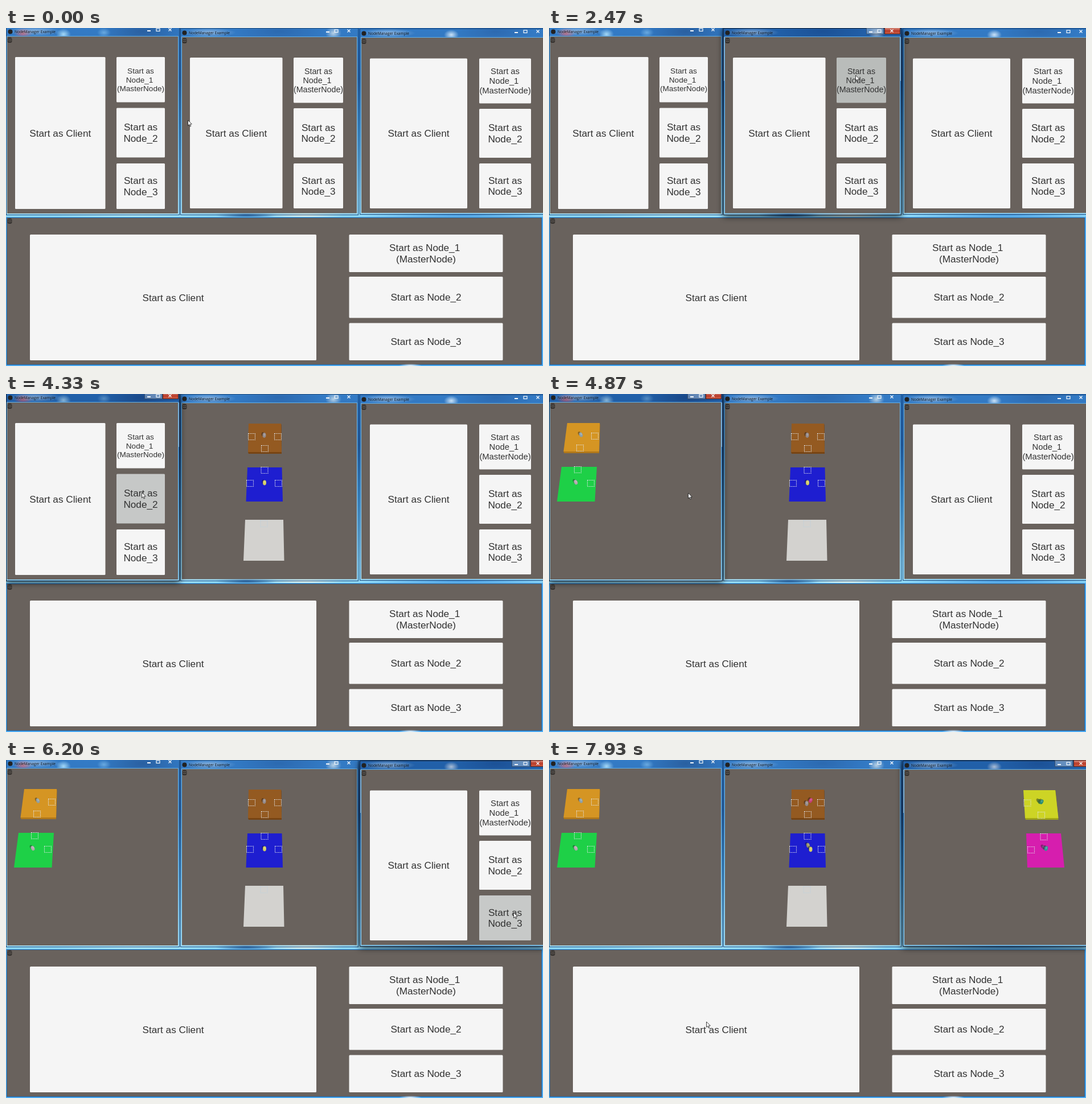
An HTML page with a canvas that plays this animation: 943 px wide and 594 px high, repeating every 8000 ms.

```html
<!DOCTYPE html>
<html lang="en">
<head>
<meta charset="utf-8">
<title>NodeManager Example</title>
<style>
html, body { margin: 0; width: 100%; height: 100%; overflow: hidden; background: #69625d; }
canvas { display: block; }
</style>
</head>
<body>
<canvas id="stage" width="943" height="594"></canvas>
<script>
const ctx = document.getElementById('stage').getContext('2d');
const LOOP = 8000, STEP = 1000 / 15;
const UI_FONT = '"Liberation Sans", Arial, sans-serif';

// frame / client: left, top, right, bottom; controls: centres of the caption buttons
const windows = [
  { frame: [0, -2, 305, 329], client: [2, 15, 302, 326], title: 6, controls: [251, 267, 288],
    buttons: { client: [16, 51, 174.5, 318], x: [194, 279], y: [51, 130.5, 140.5, 227.5, 238, 318], small: 13.6 },
    pressed: 1, press: 4267, hide: 4533, show: 4667, shade: '#c6c8c7', scene: leftScene },
  { frame: [306, 0, 619, 329], client: [309, 16, 616, 325.5], title: 8, controls: [565, 580, 602],
    buttons: { client: [323, 52, 485.5, 317], x: [505, 592], y: [52, 131.5, 141, 227.5, 238, 317], small: 14.25 },
    pressed: 0, press: 2400, hide: 2533, show: 2667, shade: '#b9bcba', scene: middleScene },
  { frame: [621, 1, 946, 328], client: [624, 17, 946, 325], title: 9, controls: [896, 912, 934],
    buttons: { client: [639, 53.5, 810, 317], x: [831, 922], y: [53.5, 132.5, 142, 228, 238, 317], small: 14.75 },
    pressed: 2, press: 6067, hide: 6267, show: 6400, shade: '#c7c9c8', scene: rightScene }
];
const bottomButtons = { client: [42, 363, 545, 584], x: [602.5, 872.5], y: [363, 429, 437, 509.5, 518.5, 584], small: 17.2, wide: true };

// time, x, y of the pointer tip
const pointerPath = [
  [0, 319, 162], [133, 319, 162], [267, 313, 157], [533, 313, 157], [733, 272, 177], [933, 237, 99],
  [1533, 237, 99], [1933, 526, 77], [2067, 538, 83], [2800, 538, 83], [3000, 455, 116], [3667, 237, 133],
  [3933, 238, 173], [4800, 238, 173], [4867, 244, 174], [5667, 895, 250], [5733, 892, 266],
  [5933, 891, 268], [6800, 891, 268], [7667, 276, 460], [8000, 276, 460]
];

const clamp = v => Math.max(0, Math.min(1, v));
const smooth = v => v * v * (3 - 2 * v);

function box([l, t, r, b], fill) {
  ctx.fillStyle = fill;
  ctx.fillRect(l, t, r - l, b - t);
}

function outline([l, t, r, b], colour, grow = 0) {
  ctx.strokeStyle = colour;
  ctx.lineWidth = 1;
  ctx.strokeRect(l - grow + .5, t - grow + .5, r - l + 2 * grow - 1, b - t + 2 * grow - 1);
}

function polygon(points, fill) {
  ctx.beginPath();
  for (let i = 0; i < points.length; i += 2) ctx.lineTo(points[i], points[i + 1]);
  ctx.closePath();
  ctx.fillStyle = fill;
  ctx.fill();
}

function vertical(top, bottom, ...stops) {
  const g = ctx.createLinearGradient(0, top, 0, bottom);
  stops.forEach(([at, colour]) => g.addColorStop(at, colour));
  return g;
}

function glow(x, y, rx, ry, rgb, alpha) {
  ctx.save();
  ctx.translate(x, y);
  ctx.scale(rx, ry);
  const g = ctx.createRadialGradient(0, 0, 0, 0, 0, 1);
  g.addColorStop(0, `rgba(${rgb},${alpha})`);
  g.addColorStop(1, `rgba(${rgb},0)`);
  ctx.fillStyle = g;
  ctx.fillRect(-1, -1, 2, 2);
  ctx.restore();
}

function wallpaper() {
  box([0, 0, 943, 594], vertical(0, 594,
    [0, '#1d66b8'], [.15, '#1c5aa4'], [.3, '#3b94d8'], [.5, '#8bd6f6'], [.56, '#8fd8f6'], [1, '#2c92e6']));
  glow(240, 6, 75, 30, '8,40,98', .55);
  glow(480, 6, 80, 22, '10,55,125', .45);
  glow(860, 6, 70, 22, '12,55,125', .45);
  glow(30, 9, 16, 9, '225,60,70', .9);
  glow(101, 11, 13, 10, '190,235,255', .9);
  glow(172, 8, 12, 8, '130,190,235', .7);
  glow(575, 9, 14, 12, '240,240,235', .8);
  glow(782, 12, 13, 9, '245,250,255', .9);
  glow(225, 328, 140, 10, '190,240,255', .8);
  glow(422, 328, 55, 8, '16,70,140', .9);
  glow(525, 328, 70, 8, '250,245,225', .9);
  glow(800, 328, 180, 10, '50,135,215', .8);
}

function label(lines, x, y, size) {
  const leading = size * 1.14;
  ctx.font = `${size}px ${UI_FONT}`;
  ctx.textAlign = 'center';
  ctx.fillStyle = '#323232';
  lines.forEach((line, i) =>
    ctx.fillText(line, x, Math.round(y + (i - (lines.length - 1) / 2) * leading + size * .36)));
}

function button(rect, lines, size, fill = '#f5f5f5') {
  const [l, t, r, b] = rect;
  ctx.beginPath();
  ctx.roundRect(l, t, r - l, b - t, 1.5);
  ctx.fillStyle = fill;
  ctx.fill();
  label(lines, (l + r) / 2, (t + b) / 2, size);
}

function menu({ client, x, y, small, wide }, pressed = -1, shade) {
  button(client, ['Start as Client'], 17.2);
  // the trailing space of Node_1 takes part in the centring
  ['Node_1 ', 'Node_2', 'Node_3'].forEach((name, i) => {
    const lines = wide ? [`Start as ${name}`] : ['Start as', name];
    if (i === 0) lines.push('(MasterNode)');
    button([x[0], y[2 * i], x[1], y[2 * i + 1]], lines, i ? 17.2 : small, i === pressed ? shade : undefined);
  });
}

function stackIcon(x, y) {
  ctx.fillStyle = '#36322f';
  ctx.beginPath();
  ctx.roundRect(x - 4, y - 4.5, 8, 9.5, 3);
  ctx.fill();
  ctx.strokeStyle = '#8a827b';
  ctx.lineWidth = .7;
  for (const dy of [-2.5, .5]) {
    ctx.beginPath();
    ctx.ellipse(x, y + dy, 3.3, 1.3, 0, 0, Math.PI);
    ctx.stroke();
  }
}

function captionButtons([min, max, close], y, active) {
  if (active) {
    const pair = [min - 8, y - 8, max + 8, y + 4], red = [close - 13, y - 8, close + 15, y + 4];
    box(pair, 'rgba(205,220,235,.4)');
    outline(pair, 'rgba(25,40,60,.6)');
    box(red, vertical(y - 8, y + 4, [0, '#d99a8c'], [.5, '#b93a28'], [1, '#cf6248']));
    outline(red, '#53201c');
  }
  box([min - 3, y - 1, min + 3, y + 1], '#f4f8fc');
  ctx.strokeStyle = '#f4f8fc';
  ctx.lineWidth = 1.2;
  ctx.strokeRect(max - 3, y - 4, 6, 4.5);
  ctx.beginPath();
  ctx.moveTo(close - 2.5, y - 4.5); ctx.lineTo(close + 2.5, y + .5);
  ctx.moveTo(close + 2.5, y - 4.5); ctx.lineTo(close - 2.5, y + .5);
  ctx.stroke();
}

function shadow(rect) {
  const [l, t, r, b] = rect;
  ctx.save();
  ctx.beginPath();
  ctx.rect(0, 0, 943, 594);
  ctx.rect(l, t, r - l, b - t);
  ctx.clip('evenodd');
  ctx.shadowColor = 'rgba(0,0,0,.8)';
  ctx.shadowBlur = 11;
  ctx.shadowOffsetY = 2;
  box(rect, '#000');
  ctx.restore();
}

function glass({ frame, client }, active) {
  const [l, top, r, b] = frame;
  if (active) shadow(frame);
  box(frame, active ? 'rgba(45,85,135,.3)' : 'rgba(130,195,245,.22)');
  if (active) box([l, client[1], r, 93], 'rgba(225,240,250,.55)');
  outline(frame, active ? '#16263a' : '#24507e');
  outline(client, vertical(top, b, [0, '#63aee4'], [.3, '#6cbcf0'], [1, active ? '#8fd4f8' : '#b4ecff']), 1);
  box(client, '#69625d');
}

function drawWindow(win, t, active) {
  const { frame, client, title } = win;
  const l = frame[0];
  glass(win, active);
  glow(l + 50, title, 48, 8, '225,240,255', .55);
  ctx.beginPath();
  ctx.arc(l + 7.5, title + .5, 4, 0, 7);
  ctx.fillStyle = '#222';
  ctx.fill();
  ctx.font = '6.6px "Open Sans", sans-serif';
  ctx.textAlign = 'left';
  ctx.fillStyle = '#0a0f16';
  ctx.fillText('NodeManager Example', l + 15, title + 3);
  captionButtons(win.controls, title - 1, active);
  stackIcon(client[0] + 4.5, client[1] + 6);

  if (t < win.hide) menu(win.buttons, t >= win.press ? win.pressed : -1, win.shade);
  else if (t >= win.show) win.scene(t);
}

function plate(points, top, side) {
  const [, , , , rx, ry, lx, ly] = points;
  if (side) polygon([lx, ly, points[2], points[3], points[2] + .7, points[3] + 3, rx, ry + 3, lx + 1, ly + 3], side);
  polygon(points, top);
}

function portals(spots, colour = '#e2e6ea') {
  ctx.save();
  ctx.strokeStyle = colour;
  ctx.lineWidth = 1.1;
  ctx.setLineDash([1.5, 1.3]);
  for (const [x, y] of spots) ctx.strokeRect(x + .5, y + .5, 12, 11);
  ctx.restore();
}

function capsule(x, y, fill, tilt = 0) {
  const oval = (dx, dy, rx, ry, colour) => {
    ctx.beginPath();
    ctx.ellipse(x + dx, y + dy, rx, ry, tilt, 0, 7);
    ctx.fillStyle = colour;
    ctx.fill();
  };
  oval(-2.5, -2, 2.5, 3.6, 'rgba(20,20,25,.4)');
  oval(0, 0, 3, 4.4, fill);
  oval(.5, -1, 1.5, 2.2, 'rgba(255,255,255,.2)');
}

function leftScene() {
  plate([32, 51, 89, 51, 88, 101, 25.5, 101], '#d59523', '#b0781a');
  portals([[74, 68], [48, 89]]);
  capsule(56, 71.5, '#8d9fa5', -.4);
  plate([22, 128, 84, 128, 80.5, 189, 14, 189], '#1ed047');
  portals([[44, 127], [67, 151]]);
  capsule(47, 155, '#b3a5ae', -.5);
}

function middleScene(t) {
  const joined = smooth(clamp((t - 6870) / 800));
  plate([426, 52, 483, 52, 484, 102, 425, 102], '#945a21', '#774413');
  portals([[425, 69], [471, 69], [448, 90]]);
  capsule(453.5 - joined, 72.5 + 4 * joined, '#93898a');
  if (joined) capsule(454 + 5.5 * joined, 72.5 - 1.5 * joined, '#c63b78', .5);
  plate([424, 129, 484.5, 129, 486, 189, 421.5, 189], '#1e1ed0');
  portals([[447.5, 128], [422, 151], [472, 151]]);
  if (joined) capsule(454 + joined, 156 - 6 * joined, '#969268', -.3);
  capsule(454 + 5.5 * joined, 156 + joined, '#d2cc62');
  plate([420, 221, 487, 221, 488.5, 293, 417, 293], '#d3d2cf');
  portals([[446.5, 222]], '#bdd0dc');
}

function rightScene() {
  plate([833, 53, 889, 53, 894.5, 102, 836, 102], '#cdd425', '#a0a518');
  portals([[833.5, 69.5], [858, 91]]);
  capsule(861, 73, '#4c7c38', -.5);
  capsule(865, 73.5, '#278a70', .45);
  plate([838, 129, 899, 129, 905, 189, 840, 189], '#d61eae');
  portals([[862.5, 129], [840, 152]]);
  capsule(869, 154, '#7d3d80', -.6);
  capsule(873, 155.5, '#359094', .3);
}

function bottomWindow() {
  const rect = [0, 332, 943, 594], client = [2, 334, 940, 591];
  box(rect, '#3c9cec');
  outline(rect, '#58b4f2');
  outline(client, '#2b5f92', 1);
  box(client, '#69625d');
  glow(710, 593, 20, 3, '255,255,255', .9);
  stackIcon(6.5, 339);
  menu(bottomButtons);
}

function pointer(t) {
  const i = Math.max(1, pointerPath.findIndex(p => p[0] >= t));
  const [t0, x0, y0] = pointerPath[i - 1], [t1, x1, y1] = pointerPath[i];
  const k = smooth(clamp((t - t0) / (t1 - t0)));
  ctx.save();
  ctx.translate(x0 + (x1 - x0) * k + .5, y0 + (y1 - y0) * k);
  ctx.beginPath();
  [[0, 0], [0, 9.6], [2.2, 7.6], [3.7, 11.1], [5.2, 10.4], [3.8, 7.1], [6.8, 6.9]]
    .forEach(p => ctx.lineTo(...p));
  ctx.closePath();
  ctx.fillStyle = '#fff';
  ctx.fill();
  ctx.strokeStyle = '#111';
  ctx.lineWidth = .8;
  ctx.stroke();
  ctx.restore();
}

function draw(ms) {
  const t = Math.floor((ms % LOOP + 4) / STEP) * STEP + 1;
  const active = windows.filter(w => t >= w.press).sort((a, b) => b.press - a.press)[0];
  wallpaper();
  bottomWindow();
  for (const w of windows) if (w !== active) drawWindow(w, t, false);
  if (active) drawWindow(active, t, true);
  pointer(Math.min(t, LOOP));
}

const start = performance.now();
function tick() {
  draw(performance.now() - start);
  requestAnimationFrame(tick);
}
tick();
</script>
</body>
</html>
```
